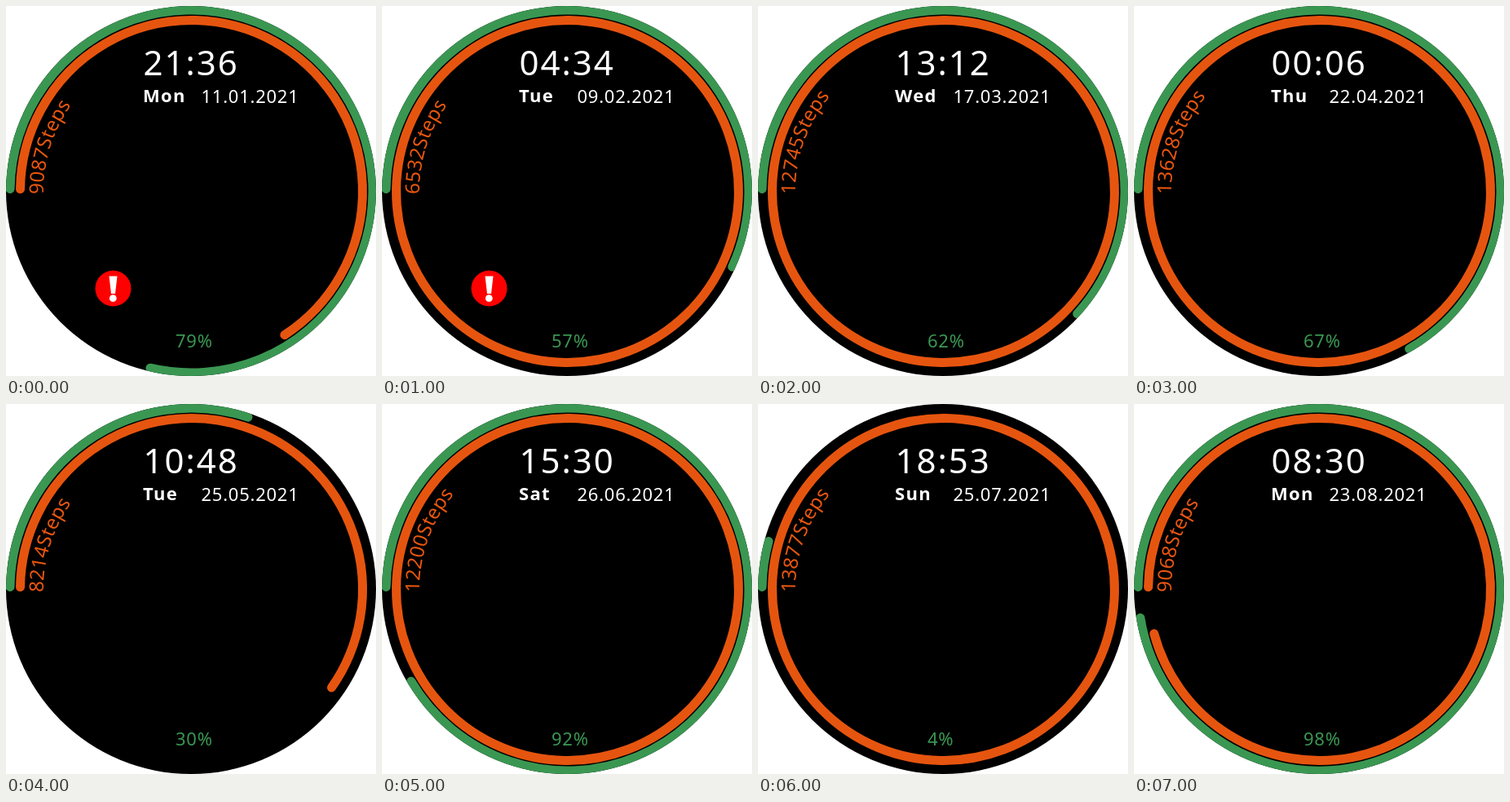
An HTML page that plays this animation: 454x454 px, repeating every 8 s.

```html
<!DOCTYPE html>
<html lang="en">
<head>
<meta charset="utf-8">
<title>Watch face</title>
<style>
html, body { margin: 0; width: 100%; height: 100%; overflow: hidden; background: #fff; }
svg { display: block; width: 454px; height: 454px; }
text { font-family: "Noto Sans", "Open Sans", sans-serif; font-size: 22px; fill: #fff; white-space: pre; }
#time { font-size: 42px; letter-spacing: 2px; }
#day { letter-spacing: 1.3px; font-weight: 600; }
#date, #level { letter-spacing: .75px; }
#level { fill: #3a9752; }
#steps { font-size: 24px; fill: #e8560f; }
.ring { fill: none; stroke-width: 11; stroke-linecap: round; }
</style>
</head>
<body>
<svg viewBox="0 0 454 454">
  <defs>
    <clipPath id="face"><circle cx="227" cy="227" r="227"/></clipPath>
    <path id="curve" d="M46 231A181.5 181.5 0 0 1 227.5 46"/>
  </defs>
  <g clip-path="url(#face)">
    <rect width="454" height="454" fill="#000"/>
    <path id="battery" class="ring" stroke="#3a9752"/>
    <path id="goal" class="ring" stroke="#e6550f"/>
  </g>
  <text id="time" x="168.4" y="85"></text>
  <text id="day" x="168" y="118"></text>
  <text id="date" x="239.5" y="119"></text>
  <text id="level" x="208" y="419"></text>
  <text><textPath id="steps" href="#curve"></textPath></text>
  <g id="alert">
    <circle cx="131.5" cy="346.5" r="22" fill="#f00"/>
    <path d="M126.5 331.5H136.5L134 353H129Z" fill="#fff"/>
    <circle cx="131.3" cy="358.7" r="4.4" fill="#fff"/>
  </g>
</svg>
<script>
const HOLD = 1000;
const $ = id => document.getElementById(id);

// time, day, date, battery %, steps, goal sweep in degrees, alert
const states = [
  ["21:36", "Mon", "11.01.2021", 79, 9087, 237, true],
  ["04:34", "Tue", "09.02.2021", 57, 6532, 360, true],
  ["13:12", "Wed", "17.03.2021", 62, 12745, 360, false],
  ["00:06", "Thu", "22.04.2021", 67, 13628, 360, false],
  ["10:48", "Tue", "25.05.2021", 30, 8214, 215, false],
  ["15:30", "Sat", "26.06.2021", 92, 12200, 360, false],
  ["18:53", "Sun", "25.07.2021", 4, 13877, 360, false],
  ["08:30", "Mon", "23.08.2021", 98, 9068, 345, false]
];

// Clockwise arc from just above nine o'clock
function arc(r, end) {
  const c = 227.5;
  const point = deg => {
    const a = (deg + 180) * Math.PI / 180;
    return (c + r * Math.cos(a)).toFixed(2) + " " + (c + r * Math.sin(a)).toFixed(2);
  };
  const start = 0.8, mid = (start + end) / 2, seg = `A${r} ${r} 0 0 1 `;
  return `M${point(start)}${seg}${point(mid)}${seg}${point(end)}`;
}

let shown = -1;
function draw(ms) {
  const i = Math.floor(ms / HOLD) % states.length;
  if (i === shown) return;
  shown = i;
  const [time, day, date, level, steps, sweep, alert] = states[i];
  $("time").textContent = time;
  $("day").textContent = day;
  $("date").textContent = date;
  $("level").textContent = level + "%";
  $("steps").textContent = steps + "Steps";
  $("battery").setAttribute("d", arc(222.5, 1.1 + level * 3.57));
  $("goal").setAttribute("d", arc(210, sweep < 360 ? sweep : 360.8));
  $("alert").style.display = alert ? "" : "none";
}

const t0 = performance.now();
function tick() {
  draw(performance.now() - t0);
  requestAnimationFrame(tick);
}
tick();
</script>
</body>
</html>
```
